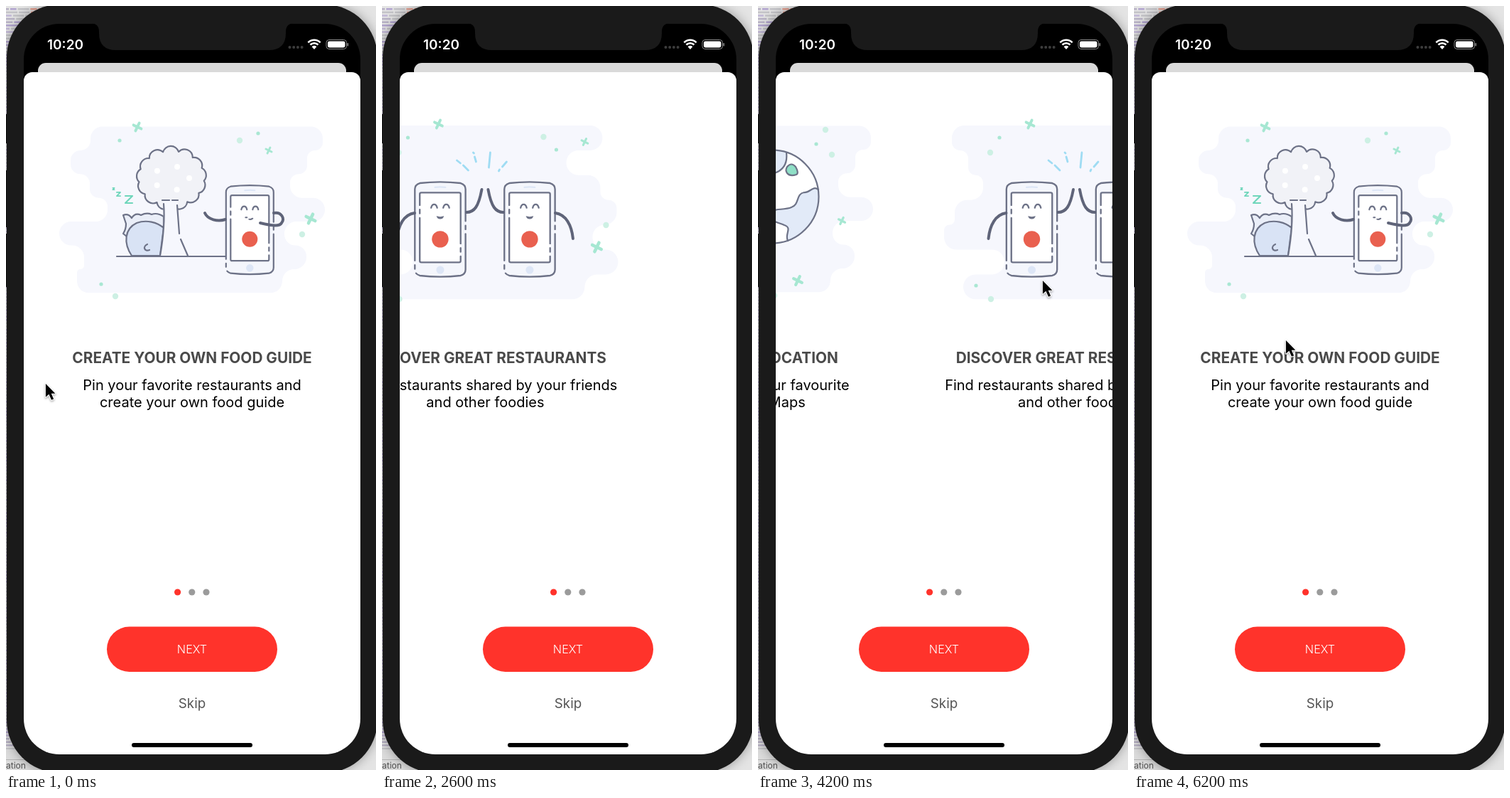
Recreate the animation shown at these times as an HTML page with a canvas. Size 521 by 1074 pixels, loop 6.6 s.

```html
<!DOCTYPE html>
<html lang="en">
<head>
<meta charset="utf-8">
<title>Onboarding pager</title>
<style>
html, body { margin: 0; width: 100%; height: 100%; overflow: hidden; background: #e2e2e2; }
canvas { display: block; width: 521px; height: 1074px; }
</style>
</head>
<body>
<canvas id="stage"></canvas>
<script>
const W = 521, H = 1074, LOOP = 6600, TICK = 200, PAGE = 474;
const SETTLE = 70, TRAVEL = 400;
const INK = '#6d7287', ARM = '#5f6479', BLOB = '#f6f7fd', BLUE = '#dde6f6', LAND = '#e2eaf8';
const MINT = '#8fdfc6', PALE = '#cdf0e4', BEZEL = '#1a1a1a', RED = '#ff332b', BADGE = '#e9604f';
const cv = document.getElementById('stage');
const dpr = window.devicePixelRatio || 1;
cv.width = W * dpr;
cv.height = H * dpr;
const c = cv.getContext('2d');

// grip is how much of the pointer's travel the page follows
const swipe = (t0, t1, [x0, y0], [x1, y1], from, to, grip = 1) =>
  ({ t0, t1, x0, y0, x1, y1, from: from * PAGE, to: to * PAGE, grip });
const SWIPES = [
  swipe(0, 0, [55, 530], [55, 530], 0, 0),
  swipe(200, 600, [330, 440], [80, 430], 0, 1),
  swipe(864, 1264, [333, 389], [57, 434], 1, 2),
  swipe(2000, 2600, [290, 415], [-25, 420], 2, 2, 0.37),
  swipe(3800, 4200, [213, 402], [400, 385], 2, 1),
  swipe(4600, 5000, [232, 368], [414, 359], 1, 0),
  swipe(6000, 6200, [332, 338], [213, 469], 0, 0, 0)
];

const lerp = (a, b, k) => a + (b - a) * k;
const clamp = k => Math.max(0, Math.min(1, k));
const smooth = k => k * k * (3 - 2 * k);

function pose(t) {
  const i = SWIPES.findLastIndex(s => s.t0 <= t);
  const s = SWIPES[i], next = SWIPES[i + 1];
  const k = s.t1 > s.t0 ? clamp((t - s.t0) / (s.t1 - s.t0)) : 1;
  let x = lerp(s.x0, s.x1, k), y = lerp(s.y0, s.y1, k);
  let scroll = s.from + (s.x0 - x) * s.grip;
  if (t > s.t1) scroll = lerp(s.to, scroll, Math.exp((s.t1 - t) / SETTLE));
  if (next && t > s.t1) {
    const span = Math.min(TRAVEL, next.t0 - s.t1);
    const m = smooth(clamp(1 - (next.t0 - t) / span));
    x = lerp(x, next.x0, m);
    y = lerp(y, next.y0, m);
  }
  return { x, y, scroll };
}

function fill(d, color) {
  c.fillStyle = color;
  c.fill(new Path2D(d));
}
function line(d, color = INK, width = 2.2) {
  c.strokeStyle = color;
  c.lineWidth = width;
  c.lineCap = c.lineJoin = 'round';
  c.stroke(new Path2D(d));
}
function shape(d, color) {
  fill(d, color);
  line(d);
}
function disc(x, y, r, color) {
  c.fillStyle = color;
  c.beginPath();
  c.arc(x, y, r, 0, 7);
  c.fill();
}
function box(x, y, w, h, r, color, stroke) {
  c.beginPath();
  c.roundRect(x, y, w, h, r);
  if (color) {
    c.fillStyle = color;
    c.fill();
  }
  if (stroke) {
    c.strokeStyle = stroke;
    c.stroke();
  }
}
function text(s, x, y, font, color, align = 'center') {
  c.font = font + ' Inter, sans-serif';
  c.fillStyle = color;
  c.textAlign = align;
  c.fillText(s, x, y);
}
function cross(x, y, r = 6) {
  c.save();
  c.translate(x, y);
  c.rotate(0.45);
  line(`M${-r} 0H${r}M0 ${-r}V${r}`, '#a6e7d2', r * 0.65);
  c.restore();
}
const speck = (x, y) => disc(x, y, 2.6, '#a9e7d3');
const bubble = (x, y) => disc(x, y, 4.2, PALE);

// stacked bars joined with rounded inner and outer corners
function blob(rows, y, h) {
  const right = [], left = [];
  rows.forEach(([l, r], i) => {
    const a = y + i * h, b = a + h;
    right.push([r, a], [r, b]);
    left.unshift([l, b], [l, a]);
  });
  const p = right.concat(left);
  c.beginPath();
  c.moveTo((rows[0][0] + rows[0][1]) / 2, y);
  p.forEach(([x, py], i) => {
    const prev = p.at(i - 1), next = p[(i + 1) % p.length];
    const span = Math.max(Math.abs(x - prev[0]), Math.abs(x - next[0]));
    c.arcTo(x, py, ...next, Math.min(h / 2, span / 2));
  });
  c.fillStyle = BLOB;
  c.fill();
}

function phone(x, y, s, turn, smile) {
  const body = 'M-33.5 -53Q-33.5 -59 -27 -61Q0 -64 27 -61Q33.5 -59 33.5 -53V53Q33.5 59 27 61Q0 64 -27 61Q-33.5 59 -33.5 53Z';
  c.save();
  c.translate(x, y);
  c.rotate(turn);
  c.scale(s, s);
  fill(body, '#f4f6fc');
  box(-27, -48.5, 54, 92, 2, '#fff');
  c.setLineDash([118, 6, 5, 6]);
  line(body);
  box(-27, -48.5, 54, 92, 2, null, INK);
  c.setLineDash([]);
  line('M-7 -55.5Q0 -56.5 7 -55.5', BLUE, 2);
  disc(0, 53.5, 5.2, BLUE);
  line('M-12 -28.5Q-11 -33 -8 -33Q-5 -33 -4 -28.5M4 -28.5Q5 -33 8 -33Q11 -33 12 -28.5');
  if (smile) fill('M-5 -17.5Q0 -16 5 -17.5Q4 -13.5 0 -13.5Q-4 -13.5 -5 -17.5Z', INK);
  else line('M-6 -17.5H-4M-1 -15Q1 -14 4 -16', INK, 2);
  disc(0, 13, 11, BADGE);
  c.restore();
}

function crown(x, y) {
  const n = 13, pt = k => {
    const a = k * 2 * Math.PI / n + 0.1;
    return `${x + 46 * Math.cos(a)} ${y + 38 * Math.sin(a)}`;
  };
  let d = 'M' + pt(0);
  for (let k = 1; k <= n; k++) d += 'A11.5 11.5 0 0 1 ' + pt(k);
  shape(d + 'Z', '#f1f2f7');
  for (let k = 0; k < 5; k++) disc(x + 25 * Math.cos(k * 1.26), y + 17 * Math.sin(k * 1.26), 4, '#fff');
}

const ROWS = [[119, 446], [91, 424], [118, 400], [143, 449], [75, 392], [110, 423], [100, 389]];
const WIDE_ROWS = [[86, 427], [109, 376], [130, 424], [90, 447], [75, 413], [160, 449], [102, 402]];

function guidePage() {
  blob(ROWS, 169.5, 33.4);
  cross(185, 170);
  cross(370, 203, 4.5);
  cross(429, 299, 7);
  speck(160, 189);
  speck(355, 179);
  speck(134, 391);
  bubble(329, 189);
  bubble(417, 321);
  bubble(154, 408);
  for (const [x, y, r] of [[173, 272, 5], [158.5, 264.5, 2.6], [151.5, 257, 1.3]])
    line(`M${x - r} ${y - r}h${2 * r}l${-2 * r} ${2 * r}h${2 * r}`, '#6fd6bb', 1.3 + r / 6);

  shape('M170 324L165 320Q169 314 169 306L165 294Q172 291 177 298Q182 290 190 294Q198 290 205 293Q213 290 222 296V310H184Q174 315 170 324Z', '#eaeef8');
  shape('M177 351C165 333 167 313 184 305C198 300 213 304 222 312L217 351Z', '#d9e3f5');
  line('M199 335C192 338 195 346 202 343');
  fill('M221 274H241L246 320L256 351H217Q224 310 221 274Z', BLOB);
  crown(233, 242);
  fill('M221 273H242V290H222Z', BLOB);
  line('M217 351C221 328 224 304 222 278M220 273H230M234 273H242M241 280L244 320M246 328L256 351M156 352H310');
  phone(343.3, 314.7, 1, 0);
  line('M280 291C284 300 298 304 309 300M377 291C388 289 393 299 388 305C385 311 370 308 358 305', ARM, 4);
}

function mapPage() {
  blob(ROWS, 168.5, 33.4);
  cross(209, 171);
  cross(405, 302, 5);
  cross(343, 386, 6.5);
  speck(152, 225);
  speck(369, 194);
  speck(289, 376);
  bubble(163, 198);
  bubble(382, 174);
  bubble(391, 209);
  bubble(310, 407);

  // globe
  c.save();
  c.translate(307, 268);
  const north = 'M-55 -35C-47 -28 -46 -19 -39 -21C-32 -24 -34 -41 -25 -41C-16 -40 -17 -19 -8 -20C-2 -22 -8 -30 3 -33C15 -37 22 -45 20 -62';
  const east = 'M65 -10C57 -16 53 -5 45 -6C33 -4 39 11 27 15C15 20 -1 15 -5 25C-5 35 9 36 17 40C29 44 17 53 22 62';
  disc(0, 0, 65.5, '#fff');
  c.save();
  c.clip();
  fill(north + 'L0 -73L-63 -68Z', LAND);
  fill(east + 'L27 77L87 32Z', LAND);
  c.restore();
  c.lineWidth = 2.2;
  c.strokeStyle = INK;
  c.stroke();
  line(north + east);
  shape('M21 -42Q27 -49 33 -42Q38 -33 34 -31Q25 -28 21 -33Q18 -37 21 -42Z', MINT);
  shape('M-22 40Q-15 36 -10 45Q-5 54 -9 56Q-17 54 -22 40Z', MINT);
  c.restore();

  // caped phone
  c.save();
  c.translate(94, 0);
  shape('M97 286C74 301 51 312 31 318C46 317 57 323 60 334C62 341 58 346 62 351C70 343 81 346 86 356C89 363 87 370 92 372C100 364 110 366 115 375C118 380 117 385 120 386C129 376 134 358 134 336Z', '#e0e5ea');
  line('M76 301Q66 315 64 324M100 348Q94 352 93 361');
  phone(123.5, 301.5, 0.82, 0.47);
  line('M76 287C82 275 95 267 108 270M158 300C170 305 180 298 187 285', ARM, 3.4);
  c.restore();
}

function friendsPage() {
  blob(WIDE_ROWS, 168, 34.9);
  cross(196, 166);
  cross(402, 191, 4.8);
  cross(419, 339, 7);
  speck(153, 185);
  speck(362, 202);
  speck(120, 393);
  bubble(140, 206);
  bubble(344, 184);
  bubble(432, 308);
  bubble(141, 412);
  line('M222 217L227 221M231 224L238 231M245 206L246 207M247 212L249 219M269 206L267 227M292 219L286 226M282 230L281 232', '#9fdcf3', 2.8);
  for (const side of [-1, 1]) {
    c.save();
    c.translate(261.5, 0);
    phone(side * 63, 314, 1.065, 0, true);
    c.scale(side, 1);
    line('M4.5 258C9 282 15 290 26 290M99 291C114 293 122 308 124 327', ARM, 4);
    c.restore();
  }
}

const PAGES = [
  [guidePage, 'CREATE YOUR OWN FOOD GUIDE', 'Pin your favorite restaurants and', 'create your own food guide'],
  [mapPage, 'SHOW YOU THE LOCATION', 'Search and locate your favourite', 'restaurant on Maps'],
  [friendsPage, 'DISCOVER GREAT RESTAURANTS', 'Find restaurants shared by your friends', 'and other foodies']
];

function pages(scroll) {
  c.save();
  c.beginPath();
  c.rect(25, 93, PAGE, 700);
  c.clip();
  c.translate(-scroll, 0);
  for (const [art, title, a, b] of PAGES) {
    art();
    text(title, 262, 502, '700 20.8px', '#4a4a4a');
    text(a, 262, 540, '400 20px', '#000');
    text(b, 262, 563.5, '400 20px', '#000');
    c.translate(PAGE, 0);
  }
  c.restore();
}

function desktop() {
  c.fillStyle = '#e4e4e4';
  c.fillRect(0, 0, W, H);
  let seed = 7;
  const rnd = () => (seed = seed * 16807 % 2147483647) / 2147483647;
  const tints = ['#b3a6cf', '#c2b8d6', '#c4c4c8', '#b9b3c6'];
  for (let y = 3; y < 1045; y += 4.6) {
    for (let x = 0, w; x < 50; x += w + 2) {
      w = 4 + rnd() * 16;
      c.fillStyle = y < 8 && x > 22 ? '#e5a394' : tints[Math.floor(rnd() * 4)];
      c.fillRect(x, y, w, 2.6);
    }
  }
  c.fillStyle = '#dcdcdc';
  c.fillRect(0, 1046, 60, 28);
  c.fillStyle = '#b4b4b4';
  c.fillRect(0, 1059, 60, 1);
  fill('M0 152h2v41h-2zM0 231h2v80h-2zM0 320h2v75h-2z', '#111');
}

function device() {
  c.save();
  c.shadowColor = 'rgba(0,0,0,.35)';
  c.shadowBlur = 16 * dpr;
  box(1, -2, 522, 1080, 74, BEZEL);
  c.restore();
  text('ation', 0, 1072, '400 12px', '#4c4c4c', 'left');
  box(25, 25, PAGE, 1027, 50, '#000');
  fill('M120 24Q131 25 131 36V38Q131 62 155 62H370Q394 62 394 38V36Q394 25 405 24Z', BEZEL);
  text('10:20', 58, 61, '600 19px', '#fff', 'left');
  for (let i = 0; i < 4; i++) disc(399.5 + i * 5.7, 58, 2, '#3d3d3d');

  c.strokeStyle = '#fff';
  c.lineCap = 'butt';
  c.lineWidth = 2.6;
  for (const r of [12.2, 7.8]) {
    c.beginPath();
    c.arc(434, 60, r, -Math.PI * 0.75, -Math.PI * 0.25);
    c.stroke();
  }
  fill('M434 61L430.6 57.3Q434 54.4 437.4 57.3Z', '#fff');
  c.lineWidth = 1;
  box(451, 47.5, 28.5, 13, 4, null, '#8a8a8a');
  box(453, 49.5, 24.5, 9, 2.4, '#fff');
  box(480.5, 52, 1.6, 4.5, 1, '#8a8a8a');

  box(45, 80, 434, 30, 11, '#dadada');
  box(25, 93, PAGE, 959, [12, 12, 50, 50], '#fff');
}

function controls() {
  for (let i = 0; i < 3; i++) disc(241.6 + i * 20.2, 824, 4.6, i ? '#9b9b9b' : RED);
  box(142, 872.5, 240, 63.5, 31.7, RED);
  text('NEXT', 262, 910, '300 16.2px', '#fff');
  text('Skip', 262, 987, '400 18.8px', '#555');
  box(177, 1036, 170, 6, 3, '#000');
}

function pointer(x, y) {
  const d = 'M1 1V22L6 17.5L10 26.5L13.5 25L9.7 16.3H16Z';
  c.save();
  c.translate(x, y);
  c.scale(0.9, 0.9);
  c.shadowColor = 'rgba(0,0,0,.35)';
  c.shadowBlur = 3 * dpr;
  c.shadowOffsetY = 1.5 * dpr;
  line(d, '#fff', 2.4);
  c.shadowColor = 'transparent';
  fill(d, '#000');
  c.restore();
}

function draw(now) {
  const t = Math.floor((now % LOOP) / TICK) * TICK;
  const { x, y, scroll } = pose(t);
  c.setTransform(dpr, 0, 0, dpr, 0, 0);
  desktop();
  device();
  pages(scroll);
  controls();
  pointer(x, y);
}

let start;
function frame(now) {
  start ??= now;
  draw(now - start);
  requestAnimationFrame(frame);
}
draw(0);
requestAnimationFrame(frame);
</script>
</body>
</html>
```
